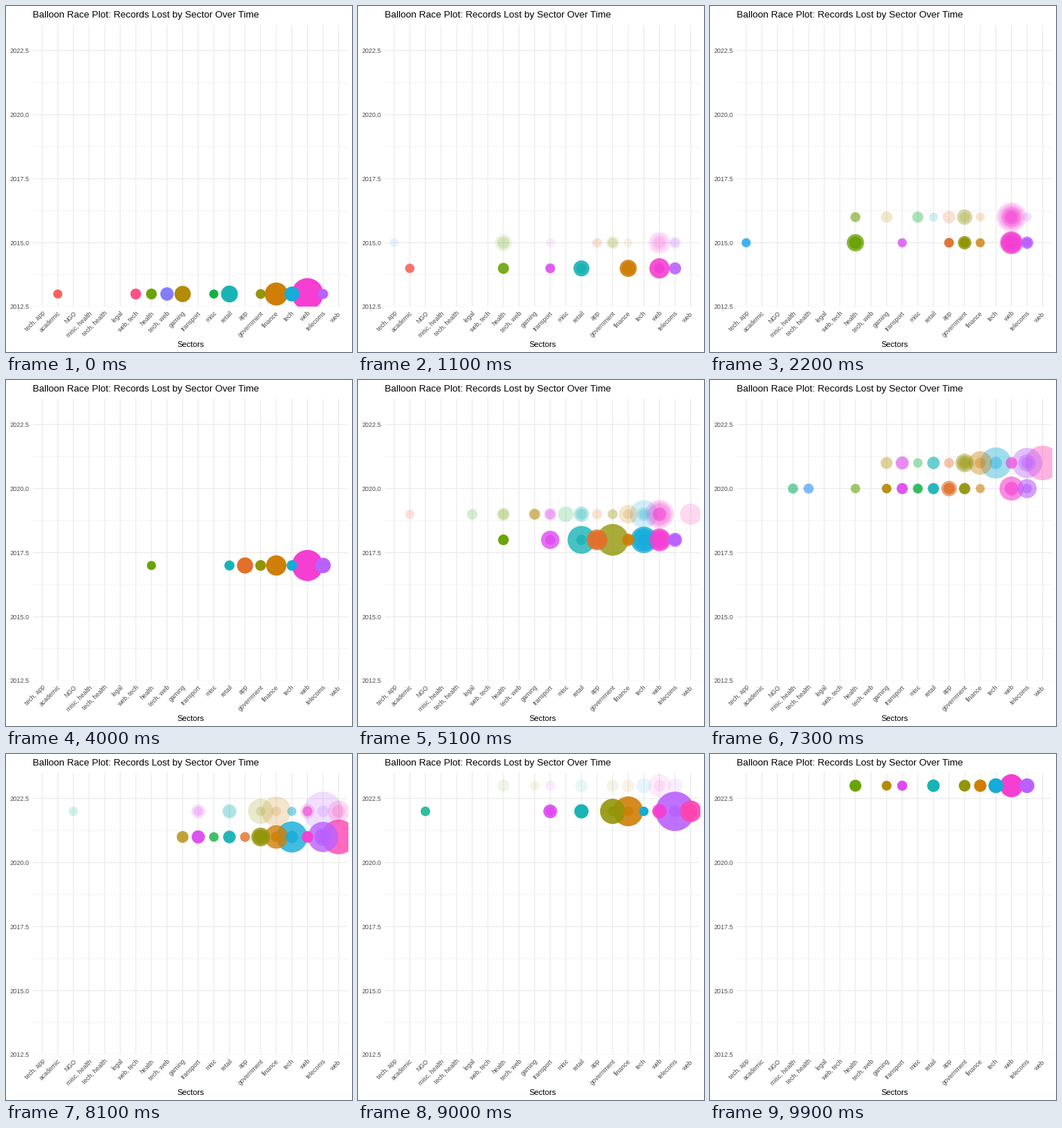
Recreate the animation shown at these times as a matplotlib script. Size 480 by 480 pixels, loop 10 s.

```python
import matplotlib.pyplot as plt
import numpy as np
from matplotlib.animation import FuncAnimation
from matplotlib.collections import PatchCollection
from matplotlib.patches import Circle, Rectangle

plt.rcParams["font.family"] = "Liberation Sans"
plt.rcParams["toolbar"] = "None"

SIZE, DPI = 480, 72
LEFT, RIGHT, TOP, BOTTOM = 37.2, 474.5, 26.2, 417.3
GRID = "#e9e9e9"
FRAMES, INTERVAL = 100, 100
FIRST_YEAR = 2013

# Sectors in axis order with their colours
SECTORS = {
    "tech, app": "#12a1f3", "academic": "#f6635a", "NGO": "#17b797",
    "misc, health": "#16b46c", "tech, health": "#2a90fd",
    "legal": "#2baa1c", "web, tech": "#fc5286", "health": "#6aa308",
    "tech, web": "#847cff", "gaming": "#b48b07", "transport": "#de4bf1",
    "misc": "#12b140", "retail": "#19b3b6", "app": "#e2702a",
    "government": "#929508", "finance": "#cf7f07", "tech": "#14acd9",
    "web": "#f53fd3", "telecoms": "#b961ff", "web ": "#ff43af",
}
NAMES = list(SECTORS)

# Balloon radii in pixels, one dict per year
YEARS = [
    {"academic": [6.3], "web, tech": [7.5], "health": [7.5],
     "tech, web": [9.3], "gaming": [11.3], "misc": [6.3],
     "retail": [11.7], "government": [6.8], "finance": [16],
     "tech": [10.3], "web": [22, 11, 11, 8], "telecoms": [7]},
    {"academic": [6.5], "health": [7.7], "transport": [6.8],
     "retail": [11.1, 7, 7], "finance": [11.9, 9.2, 7.3],
     "web": [14, 7.3, 6.5], "telecoms": [8.4]},
    {"tech, app": [6.3], "health": [12, 8.5, 8.5], "transport": [6.3],
     "app": [6.6, 6.6], "government": [9.4, 7, 7], "finance": [6.3],
     "web": [15.7, 13.5, 10, 8], "telecoms": [8.6, 6.5, 6.5]},
    {"health": [7, 7, 6.8, 6.5], "gaming": [8], "misc": [8.3, 7.2],
     "retail": [6.3], "app": [8.8], "government": [11, 10.3, 7.2],
     "finance": [6.3], "telecoms": [6.3],
     "web": [20.6, 17.5, 14.6, 13.5, 11, 10, 8, 7.5]},
    {"health": [6.3], "retail": [7], "app": [11.2], "government": [7.5],
     "finance": [14.1], "tech": [7.3], "web": [21.6, 14, 8],
     "telecoms": [10.7]},
    {"health": [7.2] * 3, "transport": [12.7, 7], "retail": [19.3, 7.2],
     "app": [14.4, 12.5, 8], "government": [22], "finance": [8.7, 7],
     "tech": [18.3, 15.5, 8], "web": [15.8, 13.5, 9],
     "telecoms": [9.8, 8, 8]},
    {"academic": [6.3], "legal": [7.3], "health": [9, 7],
     "gaming": [8, 7.6, 7.3, 7], "transport": [8.6, 7.2, 7],
     "misc": [10.8], "retail": [11, 9.3, 7], "app": [7],
     "government": [7.3, 6.5], "finance": [13, 7],
     "tech": [19.4, 9.5, 6.8], "web": [20, 17, 14.5, 10, 9.5, 9, 8],
     "web ": [14.8]},
    {"misc, health": [7], "tech, health": [7], "health": [6.6],
     "gaming": [6.5] * 3, "transport": [7.9, 7.5, 7], "misc": [7, 6.3],
     "retail": [8, 7.5, 7], "app": [10.8, 8, 7.5],
     "government": [8, 7.7, 7], "finance": [6.3], "web": [16.7, 9.5],
     "telecoms": [13.3, 6.8]},
    {"gaming": [8.2], "transport": [9.2, 8.8], "misc": [6.6],
     "retail": [8.8, 8.4], "app": [6.9], "government": [13, 10.5, 7.5],
     "finance": [16.3, 7.5], "tech": [21.6, 8.5], "web": [8, 8],
     "telecoms": [21, 12, 8], "web ": [24]},
    {"NGO": [6.6], "transport": [9.6, 6.5], "retail": [10, 9],
     "government": [17.5, 6.6], "finance": [20.7, 6.8],
     "tech": [6.3] * 3, "web": [10, 7, 7, 6.8, 6.5],
     "telecoms": [27.3, 8], "web ": [15, 9]},
    {"health": [8.3], "gaming": [6.8], "transport": [7], "retail": [8.7],
     "government": [8.1], "finance": [8.6], "tech": [10.3],
     "web": [16, 8], "telecoms": [10.2]},
]
KEYS = [0, 10, 20, 30, 40, 49, 59, 69, 79, 89, 99]

STEP = (RIGHT - LEFT) / (len(NAMES) + 0.2)


def x_of(i):
    return LEFT + (i + 0.6) * STEP


def y_of(year):
    return BOTTOM - (year - 2012.5) * (BOTTOM - TOP) / 11


fig = plt.figure(figsize=(SIZE / DPI, SIZE / DPI), dpi=DPI, facecolor="white")
ax = fig.add_axes([0, 0, 1, 1])
ax.set_xlim(0, SIZE)
ax.set_ylim(SIZE, 0)
ax.axis("off")
panel = Rectangle((LEFT, TOP), RIGHT - LEFT, BOTTOM - TOP,
                  transform=ax.transData)


def grid_line(xs, ys, width):
    line, = ax.plot(xs, ys, color=GRID, lw=width, snap=False, zorder=1,
                    solid_capstyle="butt")
    line.set_clip_path(panel)


def draw_axes():
    for year in np.arange(2013.75, 2023, 2.5):
        grid_line([LEFT, RIGHT], [y_of(year)] * 2, 0.55)
    for year in np.arange(2012.5, 2023, 2.5):
        y = y_of(year)
        grid_line([LEFT, RIGHT], [y, y], 1.07)
        ax.text(32.3, y + 3.2, f"{year:.1f}", size=8.8, color="#4d4d4d",
                ha="right", va="baseline")
    for i, name in enumerate(NAMES):
        x = x_of(i)
        grid_line([x, x], [TOP, BOTTOM], 1.07)
        ax.text(x + 4.5, BOTTOM + 9.4, name, size=8.8, color="#4d4d4d",
                rotation=45, rotation_mode="anchor",
                ha="right", va="baseline")
    ax.text(LEFT, 16.2, "Balloon Race Plot: Records Lost by Sector Over Time",
            size=13.2, color="black", va="baseline")
    ax.text((LEFT + RIGHT) / 2, 473, "Sectors", size=11, color="black",
            ha="center", va="baseline")


def make_balloons(k, sectors):
    """All balloons of one year, the largest at the back."""
    items = [(r, name) for name, radii in sectors.items() for r in radii]
    items.sort(key=lambda item: -item[0])
    y = y_of(FIRST_YEAR + k)
    discs = [Circle((x_of(NAMES.index(name)), y), r) for r, name in items]
    group = PatchCollection(discs, linewidths=0, zorder=3 + k,
                            facecolors=[SECTORS[name] for _, name in items])
    ax.add_collection(group)
    group.set_clip_path(panel)
    return group


draw_axes()
balloons = [make_balloons(k, sectors) for k, sectors in enumerate(YEARS)]


def update(frame):
    # Neighbouring years cross-fade linearly
    phase = np.interp(frame, KEYS, range(len(KEYS)))
    for k, group in enumerate(balloons):
        alpha = max(0.0, 1 - abs(phase - k))
        group.set_visible(alpha > 0)
        group.set_alpha(alpha)
    return balloons


anim = FuncAnimation(fig, update, frames=FRAMES, interval=INTERVAL,
                     init_func=lambda: update(0), repeat=True,
                     repeat_delay=0, blit=False)
plt.show()
```
